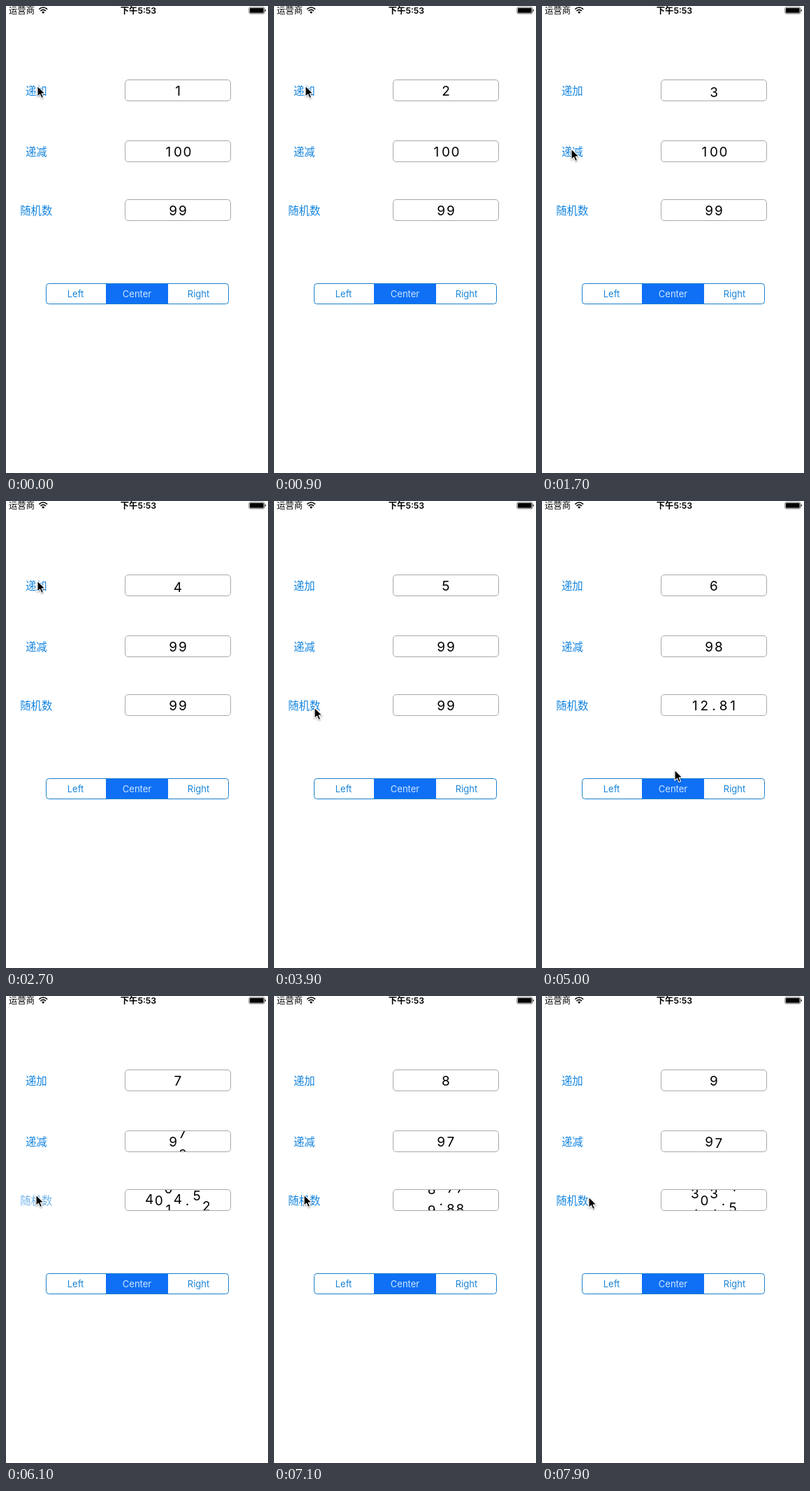
Write an HTML page that moves like this. It is 375 px wide and 667 px high and loops after 8 s.

```html
<!DOCTYPE html>
<html lang="zh">
<head>
<meta charset="utf-8">
<style>
  html, body { margin: 0; width: 100%; height: 100%; overflow: hidden; background: #fff; }
  svg { display: block; width: 375px; height: 667px; }
  text { text-anchor: middle; font-family: Inter, "Noto Sans CJK SC", "Noto Sans CJK", sans-serif; }
  .status { font-size: 12.3px; }
  .label { font-size: 15.4px; fill: #1485e0; font-family: "Noto Sans CJK SC", "Noto Sans CJK", sans-serif; }
  .digits { font-size: 19px; }
  .field { fill: none; stroke: #a9a9a9; }
  .seg { font-size: 13px; fill: #1a85d6; }
</style>
</head>
<body>
<svg viewBox="0 0 375 667">
  <g class="status">
    <text x="22.5" y="10.5">运营商</text>
    <text x="189.5" y="10.5" font-weight="600">下午5:53</text>
  </g>
  <g fill="none" stroke="#000" stroke-width="1.6">
    <path d="M47.3 4.6Q53.2 -.6 59.1 4.6M49.3 7Q53.2 3.6 57.1 7"/>
    <path d="M53.2 11L51 8.6Q53.2 6.9 55.4 8.6Z" fill="#000" stroke="none"/>
  </g>
  <rect x="347.9" y="1.9" width="21.8" height="9" rx="1.8" fill="none" stroke="#333" stroke-width=".8"/>
  <rect x="349" y="3" width="19.6" height="6.8" rx=".8"/>
  <path d="M370.7 4.6Q373.4 6.4 370.7 8.2Z"/>

  <g id="fields"></g>

  <path d="M143.5 396.5H231.5V425.5H143.5Z" fill="#0f70f5"/>
  <rect x="57.5" y="396.5" width="261" height="29" rx="4" fill="none" stroke="#1a80cc"/>
  <path d="M143.5 396.5V425.5M231.5 396.5V425.5" stroke="#0f70f5"/>
  <g class="seg">
    <text x="99.5" y="416">Left</text>
    <text x="187.5" y="416" style="fill:#cfe6ff">Center</text>
    <text x="275.5" y="416">Right</text>
  </g>

  <path id="cursor" d="M0 0V15.4L3.6 12.1L6 17.6L8.6 16.5L6.2 11.1H11Z" stroke="#fff" stroke-width="1.1" stroke-linejoin="round"
    style="filter:drop-shadow(0 1px 1px rgba(0,0,0,.35))"/>
</svg>
<script>
const LOOP = 8000, STEP = 100, ROW = 30, PITCH = 13.6, CENTER = 246;
const MOVE = 200, PRESS = 300;

const smooth = u => (1 - Math.cos(Math.PI * u)) / 2;
const easeOut = u => 1 - (1 - u) ** 2;
const clamp = u => Math.min(1, Math.max(0, u));

// Counters move changed digits by one row; the random number spins each digit up from zero.
const stepBy = dir => (c, old) => c === old ? 0 : dir;
const randoms = ['99', '12.81', '7017.93', '9.88', '505.7'];
const fields = [
  { label: '递加', y: 121, tip: [45, 114], time: 540, ease: smooth,
    taps: Array.from({ length: 8 }, (_, i) => 240 + 1010 * i),
    value: n => String(1 + n), travel: stepBy(1) },
  { label: '递减', y: 208, tip: [42, 204], time: 540, ease: smooth,
    taps: [1700, 4400, 5797, 7810],
    value: n => String(100 - n), travel: stepBy(-1) },
  { label: '随机数', y: 292, tip: [43, 284], time: 710, ease: easeOut,
    taps: [4100, 5850, 6550, 7600],
    value: n => randoms[n], travel: c => Number(c) }
];

// The cursor visits every tap, with a few stray stops.
const stops = [
  { at: -LOOP, tip: fields[0].tip },
  { at: 3900, tip: [58, 295] },
  { at: 5000, tip: [190, 384] },
  { at: 7900, tip: [67, 287] },
  ...fields.flatMap(f => f.taps.map(at => ({ at, tip: f.tip, field: f })))
].sort((a, b) => a.at - b.at);

const root = document.getElementById('fields');
const cursor = document.getElementById('cursor');

fields.forEach((f, i) => {
  root.insertAdjacentHTML('beforeend', `
    <clipPath id="clip${i}"><rect x="171" y="${f.y - 15}" width="150" height="30"/></clipPath>
    <text class="label" x="43.3" y="${f.y + 5.8}">${f.label}</text>
    <g class="digits" clip-path="url(#clip${i})"></g>
    <rect class="field" x="170.5" y="${f.y - 15.5}" width="151" height="30" rx="4.5"/>`);
  f.labelNode = root.querySelectorAll('.label')[i];
  f.digitNode = root.querySelectorAll('.digits')[i];
});

function column(char, x, y, offset) {
  const glyph = (c, dy) => `<text x="${x}" y="${y + 7 + dy}">${c}</text>`;
  if (char === '.') return glyph(char, 0);
  const pos = Number(char) - offset;
  const first = Math.floor(pos);
  return [first, first + 1]
    .map(d => glyph((d + 10) % 10, (d - pos) * ROW))
    .join('');
}

function drawField(f, t) {
  const n = f.taps.filter(at => at < t).length;
  const text = f.value(n);
  const old = n ? f.value(n - 1).slice(-text.length).padStart(text.length) : text;
  const left = n ? 1 - f.ease(clamp((t - f.taps[n - 1]) / f.time)) : 0;
  f.digitNode.innerHTML = [...text].map((c, i) => {
    const x = CENTER + (i - (text.length - 1) / 2) * PITCH;
    return column(c, x, f.y, left && f.travel(c, old[i]) * left);
  }).join('');
}

function drawCursor(t) {
  const i = stops.findLastIndex(s => s.at <= t);
  const from = stops[i], to = stops[i + 1] || from;
  const start = Math.max(from.at, to.at - MOVE);
  const k = to === from ? 0 : smooth(clamp((t - start) / (to.at - start)));
  const [x, y] = from.tip.map((v, j) => v + (to.tip[j] - v) * k);
  cursor.setAttribute('transform', `translate(${x} ${y})`);

  const age = t - from.at;
  for (const f of fields) {
    const pressed = f === from.field && age > 0 && age < PRESS;
    f.labelNode.setAttribute('opacity', pressed ? .6 : 1);
  }
}

let shown = -1;
function tick() {
  const t = Math.floor(performance.now() % LOOP / STEP) * STEP;
  if (t !== shown) {
    shown = t;
    fields.forEach(f => drawField(f, t));
    drawCursor(t);
  }
  requestAnimationFrame(tick);
}
tick();
</script>
</body>
</html>
```
